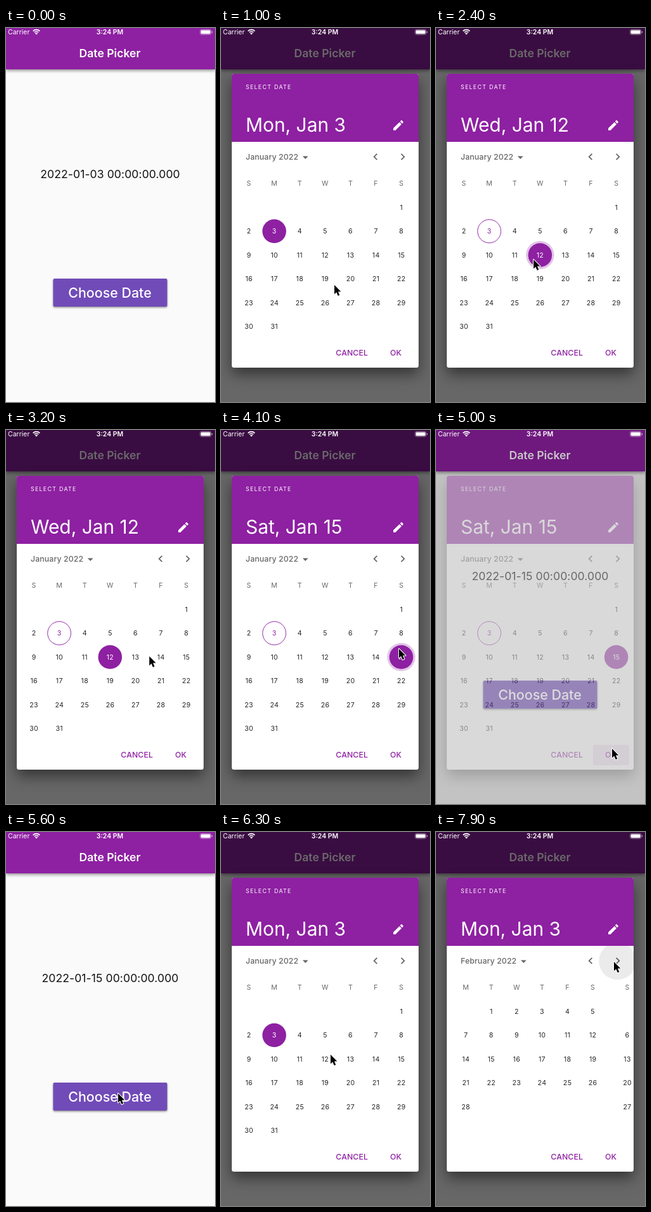
Animation of 330x588 px, one loop 8000 ms. Source, as an HTML page with a canvas:

```html
<!DOCTYPE html>
<html lang="en">
<head>
<meta charset="utf-8">
<title>Date Picker</title>
<style>
html, body { margin: 0; width: 100%; height: 100%; overflow: hidden; background: #fafafa; }
canvas { display: block; width: 330px; height: 588px; }
</style>
</head>
<body>
<canvas id="stage"></canvas>
<script>
const W = 330, H = 588, LOOP = 8000, STEP = 100;
const PURPLE = '#8e20a2', GREY = 'rgba(0,0,0,.6)', INK = 'rgba(0,0,0,.85)';
const BOX = { x: 17, y: 72, w: 295, h: 462, split: 179 };
const DAYS = ['Sun', 'Mon', 'Tue', 'Wed', 'Thu', 'Fri', 'Sat'];
const MONTHS = ['January', 'February', 'March'];

const ICONS = {
  edit: 'M3 17.25V21h3.75L17.81 9.94l-3.75-3.75L3 17.25zM20.71 7.04c.39-.39.39-1.02 0-1.41l-2.34-2.34c-.39-.39-1.02-.39-1.41 0l-1.83 1.83 3.75 3.75 1.83-1.83z',
  left: 'M15.41 7.41L14 6l-6 6 6 6 1.41-1.41L10.83 12z',
  right: 'M10 6L8.59 7.41 13.17 12l-4.58 4.59L10 18l6-6z',
  drop: 'M7 10l5 5 5-5z'
};
const ARROW = new Path2D('M0 0V14.6L3.3 11.5 5.7 17.1 8.3 16 5.9 10.5H10.4Z');

// Pointer stops: time, x, y
const STOPS = [
  [100, 345, 330], [600, 186, 412], [900, 179, 406], [1000, 179, 404],
  [1300, 179, 403], [2000, 154, 364], [2700, 154, 364], [3600, 278, 350],
  [3900, 281, 344], [4300, 281, 344], [4700, 278, 501], [5100, 278, 501],
  [5600, 177, 411], [6000, 177, 408], [6300, 173, 350], [6500, 171, 342],
  [7100, 281, 204]
];
const OPEN_1 = 1000, CLOSE = 4900, OPEN_2 = 6000;
const PICK_12 = 2300, PICK_15 = 4000;
const SLIDES = [7187, 7887];

function makeLayer(canvas) {
  const ratio = window.devicePixelRatio || 1;
  canvas.width = W * ratio;
  canvas.height = H * ratio;
  const c = canvas.getContext('2d');
  c.scale(ratio, ratio);
  return c;
}

const stage = document.getElementById('stage');
const sheet = document.createElement('canvas');
const main = makeLayer(stage), layer = makeLayer(sheet);

const within = (t, a, b) => t >= a && t < b;
const clamp = v => Math.max(0, Math.min(1, v));

function label(c, str, x, y, size, color, { weight = 400, align = 'left', gap = 0 } = {}) {
  c.font = `${weight} ${size}px Inter, Roboto, sans-serif`;
  c.letterSpacing = gap + 'px';
  c.textAlign = align;
  c.fillStyle = color;
  c.fillText(str, x, y);
  return c.measureText(str).width;
}

function rect(c, x, y, w, h, r, color) {
  c.beginPath();
  c.roundRect(x, y, w, h, r);
  c.fillStyle = color;
  c.fill();
}

function disc(c, x, y, r, color) {
  c.beginPath();
  c.arc(x, y, r, 0, 2 * Math.PI);
  c.fillStyle = color;
  c.fill();
}

function shadow(c, dy, blur, alpha, draw) {
  const ratio = window.devicePixelRatio || 1;
  c.save();
  c.shadowColor = `rgba(0,0,0,${alpha})`;
  c.shadowOffsetY = dy * ratio;
  c.shadowBlur = blur * ratio;
  draw();
  c.restore();
}

function icon(c, name, x, y, color) {
  c.save();
  c.translate(x, y);
  c.scale(.88, .88);
  c.translate(-12, -12);
  c.fillStyle = color;
  c.fill(new Path2D(ICONS[name]));
  c.restore();
}

function drawHome(c, t) {
  c.fillStyle = '#fafafa';
  c.fillRect(0, 0, W, H);
  shadow(c, 2, 5, .45, () => rect(c, 0, 0, W, 65, 0, PURPLE));
  label(c, 'Date Picker', 164, 46, 17.6, '#fff', { weight: 600, align: 'center' });

  const day = t < CLOSE ? '03' : '15';
  label(c, `2022-01-${day} 00:00:00.000`, 164.5, 236, 17.6, '#111', { align: 'center', gap: .07 });

  const pressed = within(t, 800, OPEN_1) || within(t, 5800, OPEN_2);
  shadow(c, pressed ? 3 : 1.5, pressed ? 6 : 3, .45, () => rect(c, 74.5, 394, 180, 44, 2, '#714bb8'));
  if (pressed) rect(c, 74.5, 394, 180, 44, 2, 'rgba(255,255,255,.16)');
  label(c, 'Choose Date', 164, 424, 21.4, '#fff', { weight: 500, align: 'center' });
}

function drawMonth(c, month, dx, picked, splash) {
  const first = new Date(2022, month, 1).getDay();
  const count = new Date(2022, month + 1, 0).getDate();
  const colX = i => 44 + dx + i * 40.1;
  const cell = (str, x, y, color) =>
    label(c, str, x + .15, y + 3.9, 10.6, color, { align: 'center', gap: .3 });

  DAYS.forEach((d, i) => cell(d[0], colX(i), 244.2, GREY));
  for (let d = 1; d <= count; d++) {
    const slot = first + d - 1;
    const x = colX(slot % 7), y = 282 + Math.floor(slot / 7) * 37.5;
    let color = INK;
    if (month === 0 && d === picked) {
      if (splash) disc(c, x, y, 22.3, 'rgba(142,32,162,.26)');
      disc(c, x, y, 18.8, PURPLE);
      color = '#fff';
    } else if (month === 0 && d === 3) {
      c.beginPath();
      c.arc(x, y, 18.4, 0, 2 * Math.PI);
      c.strokeStyle = PURPLE;
      c.lineWidth = .95;
      c.stroke();
      color = PURPLE;
    }
    cell(String(d), x, y, color);
  }
}

function drawDialog(c, t) {
  const { x, y, w, h, split } = BOX;
  let picked = 3;
  if (t < OPEN_2) picked = t >= PICK_15 ? 15 : t >= PICK_12 ? 12 : 3;
  const splash = within(t, PICK_12, PICK_12 + 300) || within(t, PICK_15, PICK_15 + 300);
  const page = SLIDES.reduce((sum, s) => sum + 1 - (1 - clamp((t - s) / 200)) ** 2, 0);

  c.clearRect(0, 0, W, H);
  shadow(c, 10, 22, .5, () => rect(c, x, y, w, h, 3.5, '#fff'));
  c.save();
  c.beginPath();
  c.roundRect(x, y, w, h, 3.5);
  c.clip();

  c.fillStyle = PURPLE;
  c.fillRect(x, y, w, split - y);
  label(c, 'SELECT DATE', 39, 95.8, 8.8, '#fff', { gap: 1.32 });
  const weekday = DAYS[new Date(2022, 0, picked).getDay()];
  label(c, `${weekday}, Jan ${picked}`, 39, 163, 29.9, '#fff');
  icon(c, 'edit', 280, 153, '#fff');

  c.beginPath();
  c.rect(x, split, w, h);
  c.clip();
  if (within(t, 7100, 7400) || t >= 7800) disc(c, 286.5, 203, 29.3, 'rgba(0,0,0,.08)');
  const name = MONTHS[Math.round(page)] + ' 2022';
  const width = label(c, name, 39, 207, 12.3, GREY, { weight: 500, gap: .12 });
  icon(c, 'drop', 39 + width + 11, 203.3, GREY);
  icon(c, 'left', 244, 202.5, GREY);
  icon(c, 'right', 287, 202.5, GREY);

  MONTHS.forEach((_, m) => {
    const dx = (m - page) * w;
    if (Math.abs(dx) < w) drawMonth(c, m, dx, picked, splash);
  });

  if (within(t, 4800, 5200)) rect(c, 248, 495, 57, 32, 3, 'rgba(142,32,162,.14)');
  label(c, 'CANCEL', 181.3, 515.3, 12.3, PURPLE, { weight: 500, gap: .08 });
  label(c, 'OK', 267, 515.3, 12.3, PURPLE, { weight: 500, gap: .08 });
  c.restore();
}

function drawStatus(c) {
  label(c, 'Carrier', 3, 10, 10.5, '#fff');
  label(c, '3:24 PM', 164, 10, 10.5, '#fff', { weight: 600, align: 'center' });

  c.strokeStyle = '#fff';
  c.lineWidth = 1.6;
  for (const r of [4.6, 7.6]) {
    c.beginPath();
    c.arc(48, 10.2, r, -Math.PI * .75, -Math.PI * .25);
    c.stroke();
  }
  c.beginPath();
  c.moveTo(48, 10.6);
  c.arc(48, 10.6, 3, -Math.PI * .75, -Math.PI * .25);
  c.fillStyle = '#fff';
  c.fill();

  c.beginPath();
  c.roundRect(306.4, 2.4, 17.6, 8, 2.4);
  c.strokeStyle = 'rgba(255,255,255,.5)';
  c.lineWidth = .8;
  c.stroke();
  rect(c, 307.6, 3.6, 15.2, 5.6, 1.4, '#fff');
  rect(c, 324.8, 5, 1.3, 2.8, .7, 'rgba(255,255,255,.6)');
}

function drawPointer(c, t) {
  if (t < STOPS[0][0]) return;
  let i = 0;
  while (i < STOPS.length - 2 && t >= STOPS[i + 1][0]) i++;
  const [t0, x0, y0] = STOPS[i], [t1, x1, y1] = STOPS[i + 1];
  const k = clamp((t - t0) / (t1 - t0)), e = k * k * (3 - 2 * k);
  c.save();
  c.translate(x0 + (x1 - x0) * e, y0 + (y1 - y0) * e);
  c.lineJoin = 'round';
  c.lineWidth = 2;
  c.strokeStyle = '#fff';
  c.stroke(ARROW);
  c.fillStyle = '#000';
  c.fill(ARROW);
  c.restore();
}

function dialogAlpha(t) {
  if (t < OPEN_1) return 0;
  if (t >= OPEN_2) return 1;
  return clamp(1 - (t - CLOSE) / 159);
}

function render(t) {
  drawHome(main, t);
  const alpha = dialogAlpha(t);
  if (alpha > 0) {
    main.fillStyle = `rgba(0,0,0,${.59 * alpha})`;
    main.fillRect(0, 0, W, H);
    drawDialog(layer, t);
    main.globalAlpha = alpha;
    main.drawImage(sheet, 0, 0, W, H);
    main.globalAlpha = 1;
  }
  drawStatus(main);
  drawPointer(main, t);
}

const start = performance.now();
function tick() {
  const t = (performance.now() - start) % LOOP;
  render(Math.floor(t / STEP) * STEP);
  requestAnimationFrame(tick);
}
tick();
</script>
</body>
</html>
```
